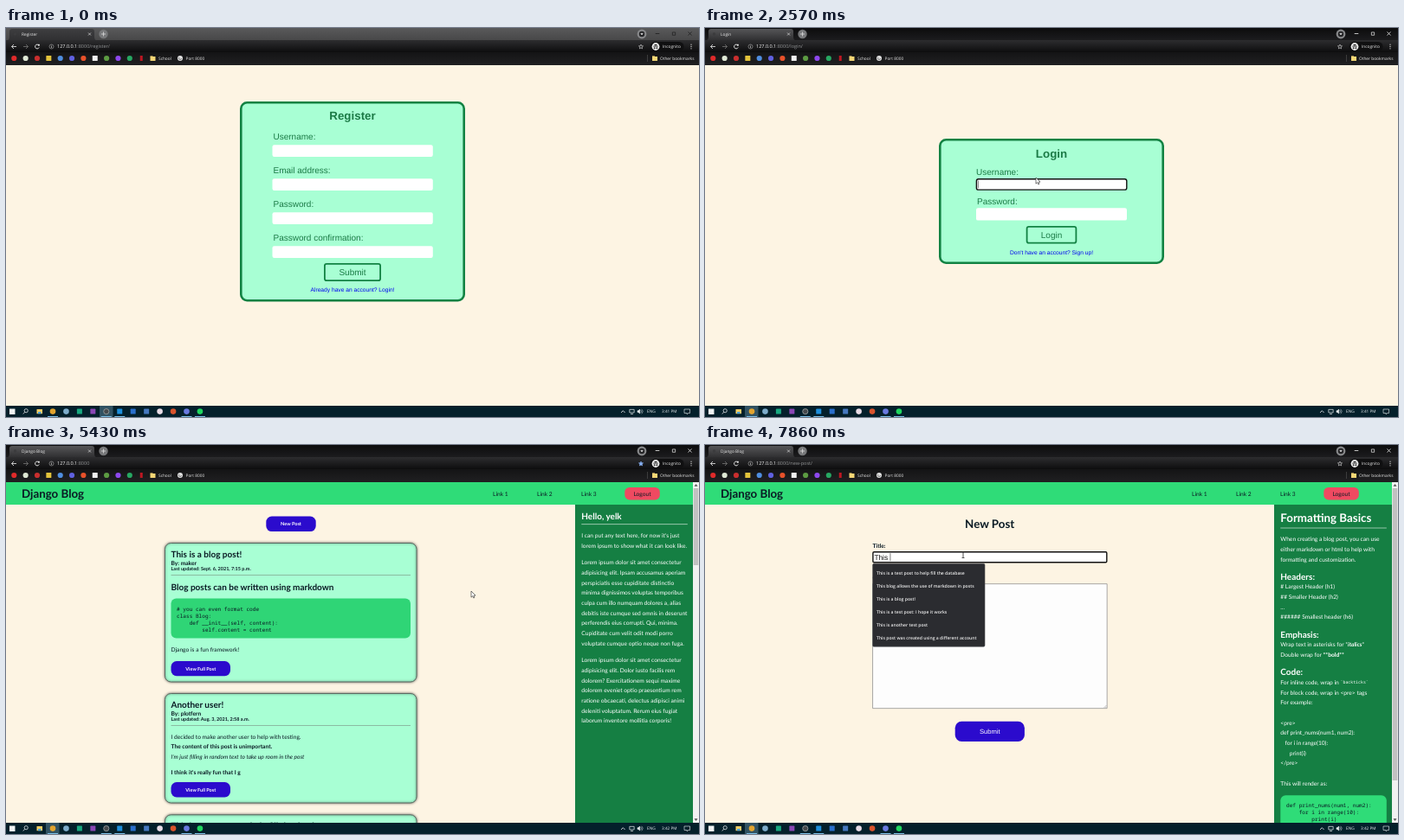
An HTML page with a canvas for the animation above (8 s loop, 800 px wide and 450 px high).

```html
<!DOCTYPE html>
<html lang="en">
<head>
<meta charset="utf-8">
<title>Blog walkthrough</title>
<style>
html, body { margin: 0; width: 100%; height: 100%; overflow: hidden; background: #fdf4e3; }
canvas { display: block; width: 800px; height: 450px; }
</style>
</head>
<body>
<canvas id="stage" width="800" height="450"></canvas>
<script>
const ctx = document.getElementById('stage').getContext('2d');
const LOOP = 8000, FPS = 7;
const UI = '"Open Sans", sans-serif';
const ARIAL = '"Liberation Sans", Arial, sans-serif';
const LATO = 'Lato, sans-serif';
const MONO = '"Noto Sans Mono", monospace';
const CREAM = '#fdf4e3', MINT = '#a8ffd4', GREEN = '#128243', LEAF = '#2fdc78';
const INK = '#0a1a24', INDIGO = '#2b0bcd', LABEL = '#1b7a46';
const USER = 'yelk';

// y is the optical middle of the line
function text(str, x, y, size, { font = LATO, color = INK, style = '', align = 'left' } = {}) {
  ctx.font = `${style} ${size}px ${font}`;
  ctx.fillStyle = color;
  ctx.textAlign = align;
  ctx.fillText(str, x, y + size * 0.36);
  return ctx.measureText(str).width;
}

function rect(x, y, w, h, color) {
  ctx.fillStyle = color;
  ctx.fillRect(x, y, w, h);
}

function box(x, y, w, h, r, fill, stroke, lineWidth = 1) {
  const d = stroke ? lineWidth / 2 : 0;
  ctx.beginPath();
  ctx.roundRect(x + d, y + d, w - 2 * d, h - 2 * d, r);
  if (fill) { ctx.fillStyle = fill; ctx.fill(); }
  if (stroke) { ctx.strokeStyle = stroke; ctx.lineWidth = lineWidth; ctx.stroke(); }
}

function dot(x, y, r, color) {
  ctx.fillStyle = color;
  ctx.beginPath();
  ctx.arc(x, y, r, 0, 7);
  ctx.fill();
}

function line(points, color, width = 0.8) {
  ctx.strokeStyle = color;
  ctx.lineWidth = width;
  ctx.beginPath();
  points.forEach(([x, y], i) => i ? ctx.lineTo(x, y) : ctx.moveTo(x, y));
  ctx.stroke();
}

function arc(x, y, r, from, to, color, width = 0.9) {
  ctx.strokeStyle = color;
  ctx.lineWidth = width;
  ctx.beginPath();
  ctx.arc(x, y, r, from, to);
  ctx.stroke();
}

function cross(x, y, r, color, width) {
  line([[x - r, y - r], [x + r, y + r]], color, width);
  line([[x - r, y + r], [x + r, y - r]], color, width);
}

function fade(y0, y1, top, bottom) {
  const g = ctx.createLinearGradient(0, y0, 0, y1);
  g.addColorStop(0, top);
  g.addColorStop(1, bottom);
  return g;
}

// Pointer path: step, x, y
const PATH = [
  [2, 797, 340], [9, 417, 300], [13, 417, 300], [18, 382, 173], [34, 382, 173],
  [38, 537, 169], [41, 540, 169], [46, 335, 95], [48, 335, 95], [51, 298, 127]
];

function pointer(k) {
  const i = PATH.findIndex(p => p[0] >= k);
  if (i < 0) return PATH[PATH.length - 1].slice(1);
  if (i === 0) return PATH[0].slice(1);
  const [k0, x0, y0] = PATH[i - 1], [k1, x1, y1] = PATH[i];
  const u = (k - k0) / (k1 - k0), e = u * u * (3 - 2 * u);
  return [x0 + (x1 - x0) * e, y0 + (y1 - y0) * e];
}

function pageAt(k) {
  return k < 12 ? 'register' : k < 34 ? 'login' : k < 49 ? 'blog' : 'new-post';
}

function shape(points, fill, stroke) {
  ctx.beginPath();
  points.forEach(([x, y], i) => i ? ctx.lineTo(x, y) : ctx.moveTo(x, y));
  ctx.closePath();
  ctx.fillStyle = fill;
  ctx.fill();
  ctx.strokeStyle = stroke;
  ctx.lineWidth = 0.6;
  ctx.stroke();
}

function drawPointer(kind, x, y) {
  ctx.save();
  ctx.translate(x, y);
  if (kind === 'arrow') {
    shape([[0, 0], [0, 7.2], [1.7, 5.7], [2.8, 8], [3.9, 7.5], [2.9, 5.2], [5, 5.1]], '#fff', '#222');
  } else if (kind === 'hand') {
    shape([[0, 0], [1.2, 0], [1.5, 3.2], [4.6, 3.9], [5, 5], [4.5, 8.6], [0.6, 8.6], [-2, 5.4], [-1.4, 4.7], [0, 5.5]], '#fff', '#222');
  } else {
    line([[0, -3.5], [0, 3.5]], '#222', 0.8);
    line([[-1.5, -3.5], [1.5, -3.5]], '#222', 0.7);
    line([[-1.5, 3.5], [1.5, 3.5]], '#222', 0.7);
  }
  ctx.restore();
}

function drawBrowser(k, page) {
  const active = k >= 11;
  const loading = k === 11 || k === 12 || k === 32 || k === 33 || k === 48;
  const title = k < 11 ? 'Register' : k < 13 ? '127.0.0.1:8000/login/' : k < 34 ? 'Login' : 'Django Blog';
  const ui = { font: UI, color: '#e8e8e8' };

  rect(0, 0, 800, 15, active ? fade(0, 14, '#0c0c0d', '#1c1c1e') : fade(0, 14, '#59595a', '#484849'));
  ctx.beginPath();
  ctx.moveTo(1, 14.5);
  ctx.quadraticCurveTo(4, 14, 4, 10);
  ctx.lineTo(4, 4);
  ctx.quadraticCurveTo(4, 1, 7, 1);
  ctx.lineTo(99, 1);
  ctx.quadraticCurveTo(102, 1, 102, 4);
  ctx.lineTo(102, 10);
  ctx.quadraticCurveTo(102, 14, 105, 14.5);
  ctx.fillStyle = fade(1, 14, active ? '#565658' : '#3e3e40', '#303032');
  ctx.fill();
  if (loading) arc(10.5, 7, 2.4, k * 1.3, k * 1.3 + 2, '#c8c8c8', 0.8);
  else dot(10.5, 7, 1.7, '#3c3c3e');
  text(title, 18, 7, 4.8, ui);
  cross(96.5, 7, 1.5, '#ddd', 0.7);
  dot(112.5, 7, 5.2, '#77787a');
  line([[110, 7], [115, 7]], '#ddd');
  line([[112.5, 4.5], [112.5, 9.5]], '#ddd');
  dot(734, 7, 5.4, '#88898b');
  dot(734, 7, 3.2, '#242426');
  shape([[732.8, 6.3], [735.2, 6.3], [734, 8]], '#ddd', '#ddd');
  const win = active ? '#eee' : '#1d1d1e';
  line([[749.7, 6.5], [754.3, 6.5]], win);
  box(769, 4.6, 4, 4, 0, null, win, 0.7);
  cross(789.5, 6.5, 2, win, 0.8);

  rect(0, 14, 800, 15, fade(14, 28, '#2d2d2f', '#0d0d0e'));
  rect(0, 28, 800, 15, fade(28, 43, '#141415', '#202022'));
  line([[12, 21.5], [6.5, 21.5]], '#f0f0f0');
  line([[9, 19], [6.5, 21.5], [9, 24]], '#f0f0f0');
  line([[20, 21.5], [25.5, 21.5]], '#777');
  line([[23, 19], [25.5, 21.5], [23, 24]], '#777');
  if (loading) {
    cross(36, 21.5, 2.2, '#f0f0f0', 0.9);
  } else {
    arc(36, 21.5, 2.4, 0.4, 5.5, '#f0f0f0');
    rect(37, 18.8, 1.8, 1.8, '#f0f0f0');
  }
  arc(52.5, 21.5, 2.5, 0, 7, '#aaa', 0.6);
  rect(52.1, 21, 0.8, 2, '#bbb');
  rect(52.1, 19.8, 0.8, 0.7, '#bbb');
  const w = text('127.0.0.1', 59, 21.5, 5.5, { font: UI, color: '#f2f2f2' });
  text(':8000' + (page === 'blog' ? '' : `/${page}/`), 59 + w, 21.5, 5.5, { font: UI, color: '#909294' });
  const star = Array.from({ length: 10 }, (_, i) => {
    const r = i % 2 ? 1.2 : 2.7, a = i * Math.PI / 5 - Math.PI / 2;
    return [733 + r * Math.cos(a), 21.7 + r * Math.sin(a)];
  });
  shape(star, page === 'blog' ? '#8ab4f8' : '#1d1d1e', page === 'blog' ? '#8ab4f8' : '#ddd');
  box(743.5, 16, 39, 11, 5.5, '#101011');
  dot(750, 21.5, 4.4, '#f0f0f0');
  rect(747.2, 20.7, 5.6, 0.9, '#333');
  rect(748.5, 18.8, 3, 1.6, '#333');
  dot(748.6, 23.2, 1, '#333');
  dot(751.4, 23.2, 1, '#333');
  text('Incognito', 758, 21.5, 4.8, ui);
  for (const y of [19.2, 21.5, 23.8]) dot(791, y, 0.65, '#ddd');

  const marks = ['#e02a2a', '#dfe8d5', '#c92e2e', '#e3c33b', '#4f8ee0', '#5f60df', '#e8512a',
    '#f0f0f0', '#5c9b42', '#8e48ee', '#27a862', '#bd1722'];
  marks.forEach((c, i) => {
    const x = 9.3 + i * 13.35;
    if (i % 4 === 3 && i < 11) box(x - 3, 32, 6, 6, 0.5, c);
    else if (i === 11) rect(x - 1.4, 32, 3, 6, c);
    else dot(x, 35, 3.1, c);
  });
  const folder = x => { rect(x, 32.4, 3, 1, '#f4d675'); rect(x, 33, 6, 5, '#f4d675'); };
  folder(166.5);
  text('School', 176, 35, 4.8, ui);
  dot(201, 35, 3, '#e3e3e3');
  arc(201, 35, 1.5, 0, 4, '#555', 0.7);
  text('Port 8000', 207.5, 35, 4.8, ui);
  rect(740, 31, 0.6, 8, '#555');
  folder(746);
  text('Other bookmarks', 755, 35, 4.8, ui);
}

function drawTaskbar(k) {
  rect(0, 437, 800, 13, '#04202b');
  rect(k < 11 ? 108 : 46, 437, 15.5, 13, '#315262');
  box(4, 440.5, 6.5, 6.5, 0, '#f0f4f5');
  arc(23.2, 442.7, 2.1, 0, 7, '#e4e8ea', 0.8);
  line([[21.7, 444.3], [19.8, 446.5]], '#e4e8ea');
  rect(35.5, 441, 6.5, 5.2, '#f3cf65');
  rect(37, 444, 3.5, 2.2, '#4ba3dc');
  const apps = ['#e2a42f', '#7daccb', '#18a980', '#8a47b5', '#45494c', '#1e8fdc', '#2a6fcc',
    '#4678bf', '#e8dce6', '#d9532c', '#6979df', '#1fd65f'];
  const square = [2, 3, 5, 6, 7];
  apps.forEach((c, i) => {
    const x = 54 + i * 15.45;
    if (square.includes(i)) box(x - 3, 440.6, 6, 6, 0.6, c);
    else dot(x, 443.6, 3.3, c);
    if (i === 4) arc(x, 443.6, 3.1, 0, 7, '#b8bfc2', 0.6);
    if ([0, 4, 5, 10, 11].includes(i)) rect(x - 6, 449, 12, 1, '#79bde5');
  });
  const ui = { font: UI, color: '#eef2f4' };
  line([[710, 445], [712.3, 442.7], [714.6, 445]], '#eef2f4');
  box(719.5, 441, 6, 4.2, 0, null, '#eef2f4', 0.7);
  rect(721, 446, 3, 0.7, '#eef2f4');
  shape([[729, 442.8], [730, 442.8], [731.7, 441], [731.7, 446], [730, 444.4], [729, 444.4]], '#eef2f4', '#eef2f4');
  arc(731.5, 443.6, 2, -0.9, 0.9, '#ccd4d8', 0.6);
  arc(731.5, 443.6, 3.5, -0.9, 0.9, '#ccd4d8', 0.6);
  text('ENG', 740, 443.7, 4.8, ui);
  text(k < 28 ? '3:41 PM' : '3:42 PM', 757, 443.7, 4.7, ui);
  shape([[783, 441], [789.5, 441], [789.5, 445.5], [787.5, 445.5], [786.2, 447], [786.2, 445.5], [783, 445.5]], '#04202b', '#eef2f4');
}

function drawStatus(k) {
  const path = k >= 9 && k < 14 ? 'login/' : k >= 46 && k < 50 ? 'new-post/' : null;
  if (!path) return;
  box(-2, 428.5, path === 'login/' ? 53.5 : 63, 9, 1.5, '#161617');
  text('127.0.0.1:8000/' + path, 2, 433.2, 4.8, { font: UI, color: '#96989b' });
}

function formCard(y, h, title, titleY) {
  box(270, y, 260, h, 7, MINT, GREEN, 2.6);
  text(title, 400, titleY, 13.33, { font: ARIAL, color: LABEL, style: 'bold', align: 'center' });
}

function label(str, x, y) {
  text(str, x, y, 10, { font: ARIAL, color: LABEL });
}

function field(x, y, w, h, value = '', focused = false, caret = false) {
  box(x, y, w, h, 2.2, '#fff', focused ? '#111' : null, 1.4);
  const tw = text(value, x + 1.7, y + h / 2, 10, { font: ARIAL, color: '#111' });
  if (caret) rect(x + 2.2 + tw, y + 2.5, 0.6, h - 5, '#222');
}

function formButton(x, y, w, h, str) {
  box(x, y, w, h, 2.2, MINT, GREEN, 1.8);
  text(str, x + w / 2, y + h / 2, 10, { font: ARIAL, color: LABEL, align: 'center' });
}

function formLink(str, y) {
  text(str, 400, y, 6.67, { font: ARIAL, color: '#0000ee', align: 'center' });
}

function drawRegister() {
  formCard(85, 231.5, 'Register', 101.5);
  ['Username:', 'Email address:', 'Password:', 'Password confirmation:'].forEach((s, i) => {
    label(s, 308.5, 125.8 + i * 39);
    field(307.5, 135.2 + i * 39, 185.3, 13.8);
  });
  formButton(367, 272, 66, 21, 'Submit');
  formLink('Already have an account? Login!', 303);
}

function drawLogin(k) {
  const typed = Math.min(Math.max(k - 18, 0), USER.length);
  const dots = k < 24 ? 0 : k === 24 ? 1 : Math.min(13, Math.round(2 + (k - 25) * 11 / 6));
  const onUser = k >= 17 && k < 24, onPass = k >= 24;
  formCard(128, 145, 'Login', 145.5);
  label('Username:', 313, 166);
  field(312.7, 174, 174.8, 13.8, USER.slice(0, typed), onUser, onUser);
  label('Password:', 314, 200.5);
  field(313, 208.2, 174, 14.4, '•'.repeat(dots), onPass, onPass && k < 32);
  formButton(370.7, 229, 58.6, 20.5, 'Login');
  formLink("Don't have an account? Sign up!", 259.6);
}

function drawFrame(thumb) {
  rect(0, 43, 793, 26, LEAF);
  text('Django Blog', 18, 56.5, 13.33, { style: 'bold' });
  ['Link 1', 'Link 2', 'Link 3'].forEach((s, i) => text(s, 562 + i * 51, 56.5, 6.67));
  box(714.3, 49, 40.5, 14.4, 5.5, '#ef4a61');
  text('Logout', 734.5, 56.4, 6.67, { align: 'center' });
  rect(657, 69, 136, 368, '#157f43');
  rect(793, 43, 7, 394, '#f1f1f1');
  rect(793.7, 50, 5.6, thumb, '#c1c1c1');
  shape([[795, 47.5], [798, 47.5], [796.5, 45.5]], '#555', '#555');
  shape([[795, 432.5], [798, 432.5], [796.5, 434.5]], '#555', '#555');
}

function button(x, y, w, h, str, fill = INDIGO, color = '#fff') {
  box(x, y, w, h, 6.5, fill);
  text(str, x + w / 2, y + h / 2, 5.56, { color, style: 'bold', align: 'center' });
}

const side = (str, y, x = 664.3) => text(str, x, y, 6.67, { color: '#fff' });

function sideBlock(lines, y) {
  lines.forEach((s, i) => side(s, y + i * 11.67));
}

function postCard(y, h, title, author, date) {
  ctx.save();
  ctx.shadowColor = 'rgba(0,0,0,.55)';
  ctx.shadowBlur = 3;
  box(183, y, 291.5, h, 7, MINT, '#5b6b62', 1);
  ctx.restore();
  text(title, 190.5, y + 13.3, 10, { style: 'bold' });
  text('By: ' + author, 190.5, y + 23.4, 6.67, { style: 'bold' });
  text('Last updated: ' + date, 190.5, y + 30.3, 5.53, { style: 'bold' });
  rect(190.5, y + 37, 276.5, 0.8, '#85aa97');
}

function codeLines(lines, x, y) {
  lines.forEach((s, i) => text(s, x, y + i * 7.85, 6.1, { font: MONO }));
}

function drawBlog(hover) {
  drawFrame(89);
  if (hover) button(300.3, 82.5, 57.4, 17.6, 'New Post', '#74b9f7', INK);
  else button(300.3, 82.5, 57.4, 17.6, 'New Post');

  postCard(113, 161.5, 'This is a blog post!', 'maker', 'Sept. 6, 2021, 7:15 p.m.');
  text('Blog posts can be written using markdown', 190.5, 164, 10, { style: 'bold' });
  box(190.5, 177.5, 276.5, 46, 6, '#2fd576');
  codeLines(['# you can even format code', 'class Blog:', '    def __init__(self, content):',
    '        self.content = content'], 197, 189.8);
  text('Django is a fun framework!', 190.5, 236.7, 6.67);
  button(190.5, 250, 68.5, 17.2, 'View Full Post');

  postCard(287, 127.5, 'Another user!', 'plotfern', 'Aug. 3, 2021, 2:58 a.m.');
  text('I decided to make another user to help with testing.', 190.5, 337.5, 6.67);
  text('The content of this post is unimportant.', 190.5, 349, 6.67, { style: 'bold' });
  text("I'm just filling in random text to take up room in the post", 190.5, 360.6, 6.67, { style: 'italic' });
  text("I think it's really fun that I g", 190.5, 378.6, 6.67, { style: 'bold' });
  button(190.5, 390, 68.5, 17.4, 'View Full Post');

  postCard(427.3, 120, 'This is a test post to help fill the database', 'maker', 'Aug. 2, 2021, 9:20 p.m.');

  text('Hello, ' + USER, 664.3, 82.3, 10, { color: '#fff', style: 'bold' });
  rect(664.3, 91.3, 122.5, 0.8, '#b5d8c4');
  sideBlock(["I can put any text here, for now it's just", 'lorem ipsum to show what it can look like.'], 104.6);
  sideBlock(['Lorem ipsum dolor sit amet consectetur', 'adipisicing elit. Ipsam accusamus aperiam',
    'perspiciatis esse cupiditate distinctio', 'minima dignissimos voluptas temporibus',
    'culpa cum illo numquam dolores a, alias', 'debitis iste cumque sed omnis in deserunt',
    'perferendis eius corrupti. Qui, minima.', 'Cupiditate cum velit odit modi porro',
    'voluptate cumque optio neque non fuga.'], 136);
  sideBlock(['Lorem ipsum dolor sit amet consectetur', 'adipisicing elit. Dolor iusto facilis rem',
    'dolorem? Exercitationem sequi maxime', 'dolorem eveniet optio praesentium rem',
    'ratione obcaecati, delectus adipisci animi', 'deleniti voluptatum. Rerum eius fugiat',
    'laborum inventore mollitia corporis!'], 249);
}

function drawGuide() {
  const white = { color: '#fff', style: 'bold' };
  text('Formatting Basics', 664.3, 84.3, 13.33, white);
  rect(664.3, 95.6, 122.5, 0.8, '#b5d8c4');
  sideBlock(['When creating a blog post, you can use', 'either markdown or html to help with',
    'formatting and customization.'], 109);
  text('Headers:', 664.3, 152.5, 10, white);
  sideBlock(['# Largest Header (h1)', '## Smaller Header (h2)', '...', '###### Smallest header (h6)'], 164);
  text('Emphasis:', 664.3, 219, 10, white);
  let w = side('Wrap text in asterisks for *', 230.7);
  w += text('italics', 664.3 + w, 230.7, 6.67, { color: '#fff', style: 'italic bold' });
  side('*', 230.7, 664.3 + w);
  w = side('Double wrap for ', 242.3);
  text('**bold**', 664.3 + w, 242.3, 6.67, white);
  text('Code:', 664.3, 262, 10, white);
  w = side('For inline code, wrap in ', 274.2);
  text('`backticks`', 664.3 + w, 274.2, 4.9, { font: MONO, color: '#fff' });
  sideBlock(['For block code, wrap in <pre> tags', 'For example:', '', '<pre>', 'def print_nums(num1, num2):'], 286.2);
  side('for i in range(10):', 344.7, 669.5);
  side('print(i)', 356.4, 674.8);
  sideBlock(['</pre>', '', 'This will render as:'], 368);
  box(664.3, 405.2, 122.5, 60, 6, LEAF);
  codeLines(['def print_nums(num1, num2):', '    for i in range(10):', '        print(i)'], 671, 417.2);
}

function drawNewPost(k) {
  const typed = ['', 'T', 'Th', 'This', 'This '][Math.max(0, Math.min(4, k - 51))];
  const focused = k >= 51;
  drawFrame(338);
  text('New Post', 328.7, 91, 13.33, { style: 'bold', align: 'center' });
  text('Title:', 193.5, 116.3, 6.67, { style: 'bold' });
  box(193.2, 123, 271.3, 13.4, 1.2, '#fff', focused ? '#111' : '#777', focused ? 1.4 : 0.7);
  const w = text(typed, 195.4, 129.8, 8.33, { font: ARIAL, color: '#111' });
  if (focused) rect(195.6 + w, 125.2, 0.6, 9, '#222');
  text('Content:', 193.5, 153.4, 6.67, { style: 'bold' });
  box(193.2, 160.3, 271.3, 144.7, 0, '#fdfdfd', '#858585', 0.7);
  line([[460.5, 304], [463.5, 301]], '#888', 0.5);
  line([[462.3, 304], [463.5, 302.8]], '#888', 0.5);
  box(288.7, 319.7, 80.2, 23.3, 7.5, INDIGO);
  text('Submit', 328.8, 331.4, 7.6, { font: ARIAL, color: '#fff', align: 'center' });
  drawGuide();

  if (k < 52) return;
  box(193.3, 137, 130, 96.5, 1.5, '#2b2c30', '#47484c', 0.6);
  ['This is a test post to help fill the database', 'This blog allows the use of markdown in posts',
    'This is a blog post!', 'This is a test post: I hope it works', 'This is another test post',
    'This post was created using a different account'].forEach((s, i) =>
    text(s, 198, 147.7 + i * 15, 5.1, { font: UI, color: '#eee', style: '600' }));
}

function render(ms) {
  const k = Math.floor((ms % LOOP + 5) * FPS / 1000) % 56;
  const page = pageAt(k);
  const [px, py] = pointer(k);
  const overNew = page === 'blog' && px > 300 && px < 358 && py > 82 && py < 100;
  const overLink = page === 'register' && k >= 9;
  ctx.textRendering = 'geometricPrecision';

  rect(0, 0, 800, 450, CREAM);
  if (page === 'register') drawRegister();
  else if (page === 'login') drawLogin(k);
  else if (page === 'blog') drawBlog(overNew);
  else drawNewPost(k);
  drawBrowser(k, page);
  drawStatus(k);
  drawTaskbar(k);
  if (k >= 2) {
    const kind = overNew || overLink ? 'hand' : page === 'new-post' && k >= 51 ? 'beam' : 'arrow';
    drawPointer(kind, px, py);
  }
}

const start = performance.now();
function tick() {
  render(performance.now() - start);
  requestAnimationFrame(tick);
}
tick();
</script>
</body>
</html>
```
